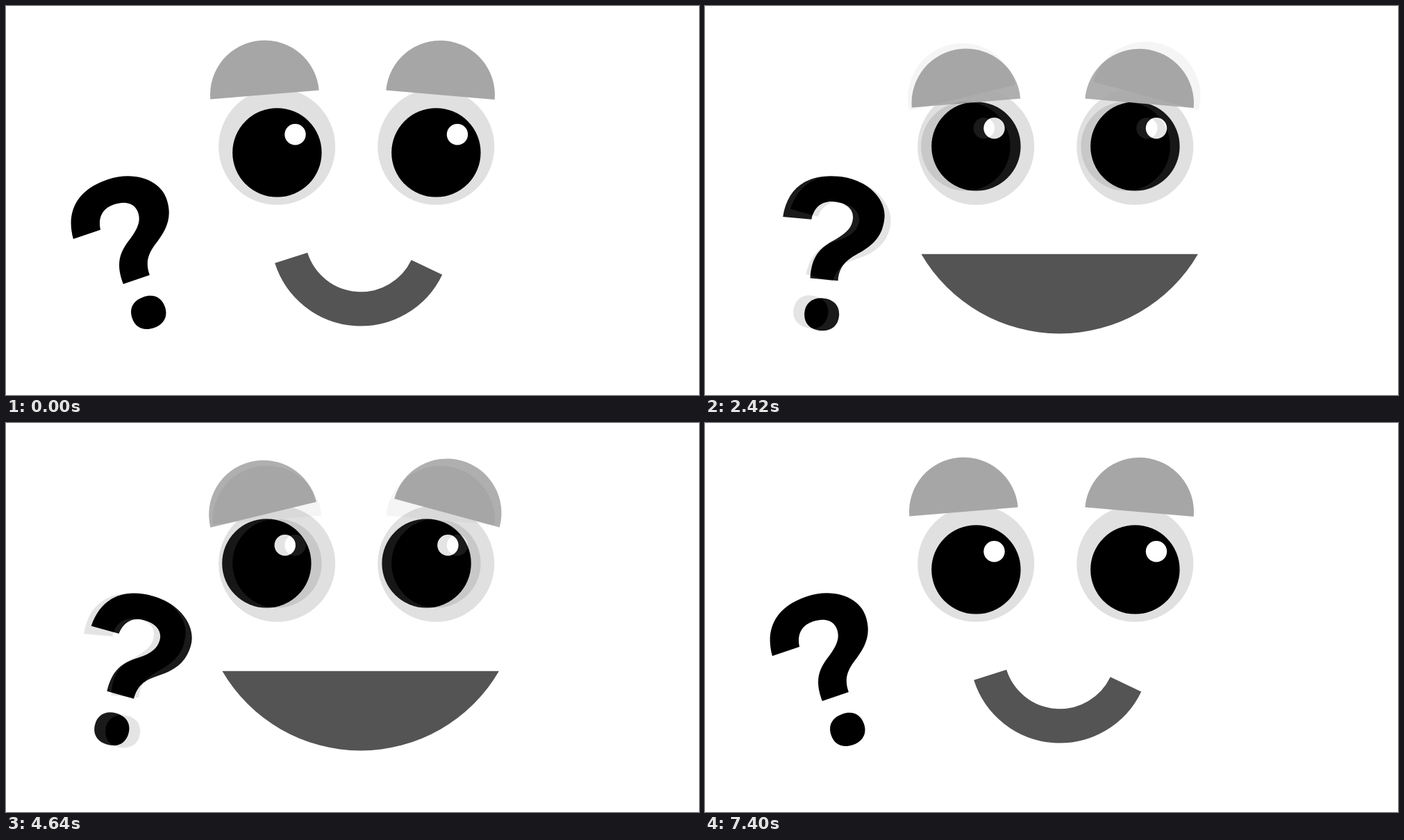
Write an HTML page that moves like this. It is 998 by 561 pixels and loops after 8140 ms.

```html
<!DOCTYPE html>
<html>
<head>
<meta charset="utf-8">
<title>Curious face</title>
<style>
  html, body { margin: 0; width: 100%; height: 100%; overflow: hidden; background: #fff; }
  svg { display: block; width: 998px; height: 561px; }
</style>
</head>
<body>
<svg viewBox="0 0 998 561"><g id="from"></g><g id="to"></g></svg>
<script>
const HOLD = 200, STEP = 60, SPAN = 740, LAST = 5, LOOP = SPAN * (2 * LAST + 1);

const GREY = '#545454';
const smile = `<path d="M410.7 363.3A105.2 105.2 0 0 0 606 376.8" fill="none" stroke="${GREY}" stroke-width="49.3"/>`;
const oval = `<ellipse cx="499" cy="410" rx="106" ry="53" fill="${GREY}"/>`;
const grin = y => `<path d="M311.5 ${y}H710A230.4 230.4 0 0 1 311.5 ${y}Z" fill="${GREY}"/>`;

// brows: [x, y, tilt]; pupils and glints: x positions sharing one height
const levelBrows = (y, x = 372.5) => [[x, y, -4.8], [625.5, y + .3, 4.9]];
const sadBrows = [[370.7, 132.2, -13.6], [635, 129.9, 15.3]];
const ahead = { pupils: [390.4, 619.4], glints: [416.5, 650] };
const aside = { pupils: [375.4, 605.6], glints: [401.8, 636.4] };
const back = { pupils: [389, 618.5], glints: [415.5, 649] };

const poses = [
  { tilt: -18.7, brows: levelBrows(128), gaze: ahead, drop: 9, mouth: smile },
  { tilt: -14.8, brows: levelBrows(128), gaze: ahead, drop: 9, mouth: oval },
  { tilt: -5.7, brows: levelBrows(111), gaze: ahead, drop: 9, mouth: grin(366) },
  { tilt: 5.3, brows: levelBrows(140, 376), gaze: ahead, drop: 0, mouth: grin(357.7) },
  { tilt: 15.7, brows: sadBrows, gaze: aside, drop: 0, mouth: grin(357.7) },
  { tilt: 26, brows: sadBrows, gaze: back, drop: 0, mouth: grin(357.7) }
];

const circle = (x, y, r, fill) => `<circle cx="${x}" cy="${y}" r="${r}" fill="${fill}"/>`;
const brow = ([x, y, a]) =>
  `<path transform="translate(${x} ${y}) rotate(${a})" d="M-78.5 0A78.5 78.5 0 0 1 78.5 0Z" fill="#a6a6a6"/>`;

const question = tilt => `<path transform="translate(180 356) rotate(${tilt})" d="
  M-72.3-45.5C-70-87-44-111 2-111C41.5-111 73.5-86.8 73.5-57
  C73.5-28 57-14 38-1C22 10 15 20 15.2 39H-25
  C-26 8-16-6 6-20C22-31 28.3-40 28.3-52C28.3-66 17-74-1-74C-18-74-29-64-31-45.5Z
  M-3.6 66c15.5 0 25 9 25 23.5s-9.5 23.5-25 23.5s-25-9-25-23.5s9.5-23.5 25-23.5Z"/>`;

const draw = ({ tilt, brows, gaze, drop, mouth }) =>
  '<rect width="998" height="561" fill="#fff"/>' +
  [390.2, 619.3].map(x => circle(x, 202.8, 84, '#e0e0e0')).join('') +
  gaze.pupils.map(x => circle(x, 202.4 + drop, 64.2, '#000')).join('') +
  gaze.glints.map(x => circle(x, 176.3 + drop, 15.2, '#fff')).join('') +
  brows.map(brow).join('') + mouth + question(tilt);

const from = document.getElementById('from'), to = document.getElementById('to');
const poseAt = i => poses[LAST - Math.abs(LAST - i)];
let shown = -1;

function render(now) {
  const t = now % LOOP, i = Math.floor(t / SPAN), into = t % SPAN;
  if (i !== shown) {
    from.innerHTML = draw(poseAt(i));
    to.innerHTML = i < 2 * LAST ? draw(poseAt(i + 1)) : '';
    shown = i;
  }
  // stepped crossfade after each hold
  const step = into < HOLD ? 0 : Math.floor((into - HOLD) / STEP) + 1;
  to.setAttribute('opacity', step / 10);
}

let start;
function tick(now) {
  start ??= now;
  render(now - start);
  requestAnimationFrame(tick);
}
render(0);
requestAnimationFrame(tick);
</script>
</body>
</html>
```
